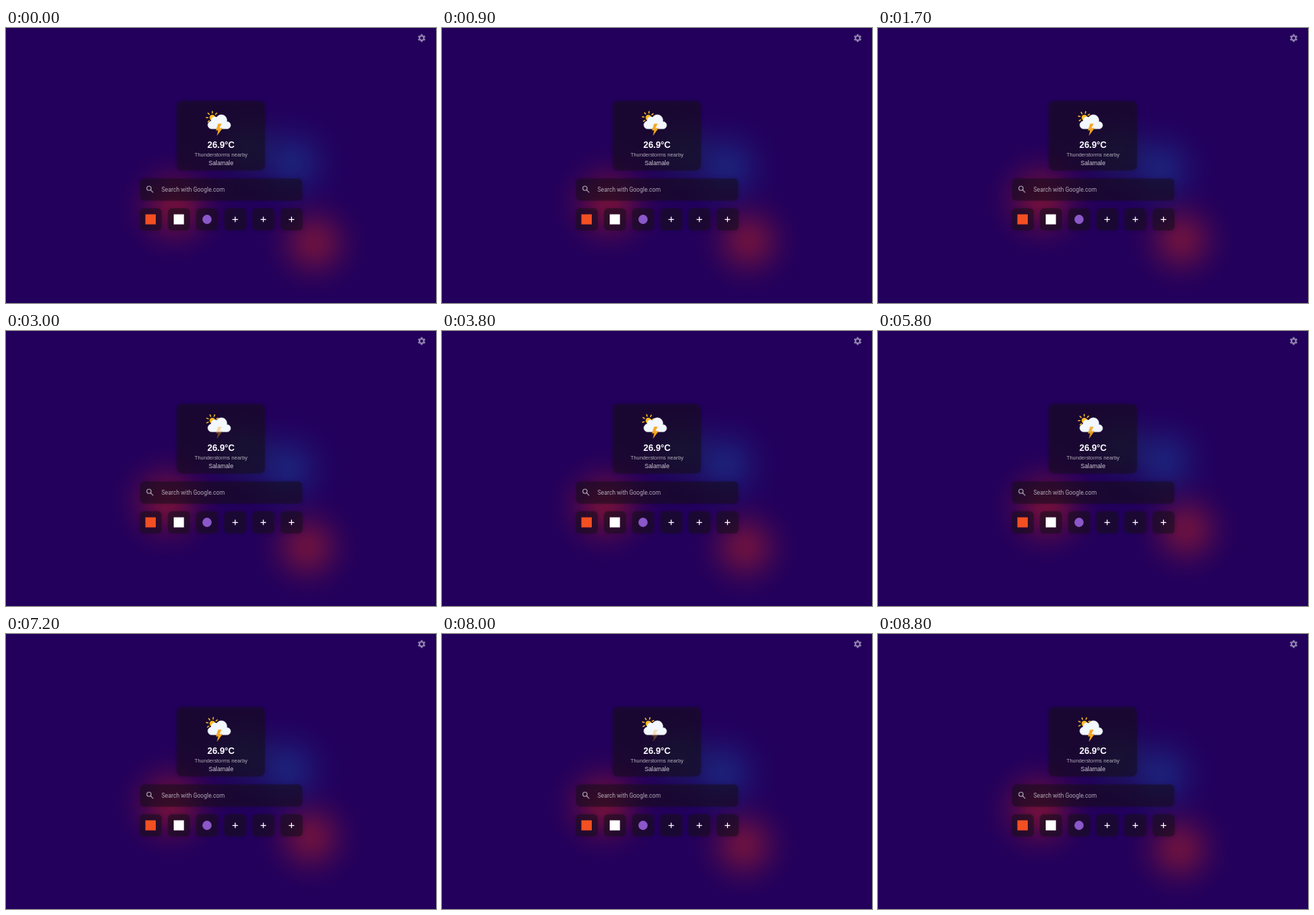
These frames come from a looping animation (600 px wide and 383 px high, 8.9 s). An HTML page:

```html
<!DOCTYPE html>
<html lang="en">
<head>
<meta charset="utf-8">
<title>New tab</title>
<style>
html, body { margin: 0; width: 100%; height: 100%; overflow: hidden; background: #22005c; }
svg { display: block; width: 100vw; height: 100vh; }
text { font-family: "Liberation Sans", Arial, sans-serif; }
.panel { fill: rgba(24, 14, 30, .55); filter: drop-shadow(0 0 2.5px rgba(0, 0, 0, .3)); }
.line { fill: none; stroke-linecap: round; }
</style>
</head>
<body>
<svg viewBox="0 0 600 383">
  <defs id="defs"></defs>
  <rect width="600" height="383" fill="#22005c"/>
  <g id="blobs"></g>
  <g id="panels"></g>

  <!-- settings -->
  <g transform="translate(580 14)" fill="none" stroke="#9182ad">
    <circle r="3.05" stroke-width="2.1"/>
    <g id="teeth" stroke-width="2.6"></g>
  </g>

  <!-- weather -->
  <g transform="translate(273.9 106.9) scale(.74)">
    <circle cx="19" cy="24" r="5" fill="#fbbf24" stroke="#f8af18" stroke-width=".5"/>
    <g id="rays" class="line" stroke="#fbbf24" stroke-width="2"></g>
    <path fill="#f3f7fe" stroke="#e6effc" stroke-width=".5" d="M46.5 31.5h-.3a10.5 10.5 0 0 0-19.1-8 7 7 0 0 0-10.6 6 7 7 0 0 0 .1 1.1A7.5 7.5 0 0 0 18 45.5h28.5a7 7 0 0 0 0-14z"/>
    <path id="bolt" fill="#f6a823" stroke="#e59a1c" stroke-width=".5" d="M30 36 26 48h4l-2 9.5L38 44h-6l4-8z"/>
  </g>
  <g text-anchor="middle">
    <text x="300" y="167" font-size="12.4" font-weight="bold" fill="#fff">26.9°C</text>
    <text x="300" y="179" font-size="7.35" fill="#b0a9b8">Thunderstorms nearby</text>
    <text x="300" y="191" font-size="8.3" fill="#cfcad6">Salamale</text>
  </g>

  <!-- search -->
  <g class="line" stroke="#aaa2b0" stroke-width="1.15">
    <circle cx="199.5" cy="223.2" r="3"/>
    <path d="m201.8 225.5 3.3 3.3"/>
  </g>
  <text x="217" y="228" font-size="8.15" fill="#b0a8b6" style="font-family:Roboto,sans-serif">Search with Google.com</text>

  <!-- shortcuts -->
  <rect x="194.5" y="259.5" width="14.5" height="14" fill="#f25022"/>
  <rect x="234" y="259.5" width="14.3" height="14" fill="#fff"/>
  <circle cx="280.5" cy="266.5" r="6.4" fill="#8a58c9"/>
  <g id="pluses" fill="none" stroke="#fff" stroke-width="1.25"></g>
</svg>

<script>
const LOOP = 8900, STEP = 100;
const $ = id => document.getElementById(id);

function add(parent, tag, attrs) {
  const el = document.createElementNS('http://www.w3.org/2000/svg', tag);
  for (const key in attrs) el.setAttribute(key, attrs[key]);
  return parent.appendChild(el);
}

// Oscillates around mid, reaching its maximum at the time "peak" (seconds).
const wave = (mid, amp, period, peak) =>
  time => mid + amp * Math.cos((time - peak) / period * 2 * Math.PI);

const sway = wave(0, 5, 5.8, 5.7);
const slowRise = wave(292, 10, 8.9, 1.9), quickRise = wave(0, -7, 4.45, 1.7);

const blobs = [
  { color: 'rgb(20,90,90)', alpha: .3, radius: 75,
    x: wave(333, 4, 5.2, 5.2), y: wave(166, -6, 7, 5.3) },
  { color: 'rgb(20,80,165)', alpha: .38, radius: 88,
    x: wave(396, 4, 5.2, 5.2), y: wave(188, -8, 7, 5.3) },
  { color: 'rgb(205,35,25)', alpha: .45, radius: 92,
    x: time => 230 + sway(time), y: wave(243, 6, 5, 4.9) },
  { color: 'rgb(200,40,30)', alpha: .42, radius: 87,
    x: time => 425 + sway(time), y: time => slowRise(time) + quickRise(time) }
];

blobs.forEach((blob, i) => {
  const gradient = add($('defs'), 'radialGradient', { id: 'glow' + i });
  for (let r = 0; r <= 1; r += .125) {
    add(gradient, 'stop', {
      offset: r, 'stop-color': blob.color,
      'stop-opacity': blob.alpha * Math.exp(-4.5 * r * r) * (1 - r ** 6)
    });
  }
  blob.el = add($('blobs'), 'circle', { r: blob.radius, fill: `url(#glow${i})` });
});

function panel(x, y, width, height, rx) {
  add($('panels'), 'rect', { x, y, width, height, rx, class: 'panel' });
}
panel(238, 101.5, 123.5, 97, 8);
panel(187, 209.5, 226.5, 31, 6);
for (let i = 0; i < 6; i++) {
  const x = 186.5 + i * 39.3;
  panel(x, 251, 31, 31, 6);
  if (i > 2) add($('pluses'), 'path', { d: `M${x + 11.6} 266.5h7.6m-3.8-3.8v7.6` });
}

for (let i = 0; i < 8; i++) {
  add($('rays'), 'path', { d: 'M19 15.7v-3.2', transform: `rotate(${i * 45} 19 24)` });
}
for (let i = 0; i < 6; i++) {
  add($('teeth'), 'path', { d: 'M0-3.6v-1.8', transform: `rotate(${i * 60})` });
}

// Two pairs of short dips in each lightning cycle.
function flicker(time) {
  const pos = (time / 1.8 * 14 + 2) % 14;
  const distance = Math.min(...[6, 8, 11, 13].map(dip => Math.abs(pos - dip)));
  return 1 - .9 * Math.max(0, 1 - distance);
}

function draw(now) {
  const time = Math.floor(now % LOOP / STEP) * STEP / 1000;
  for (const { el, x, y } of blobs) {
    el.setAttribute('cx', x(time));
    el.setAttribute('cy', y(time));
  }
  $('rays').setAttribute('transform', `rotate(${time * 7.5} 19 24)`);
  $('bolt').setAttribute('opacity', flicker(time));
}

const start = performance.now();
function tick() {
  draw(performance.now() - start);
  requestAnimationFrame(tick);
}
tick();
</script>
</body>
</html>
```
